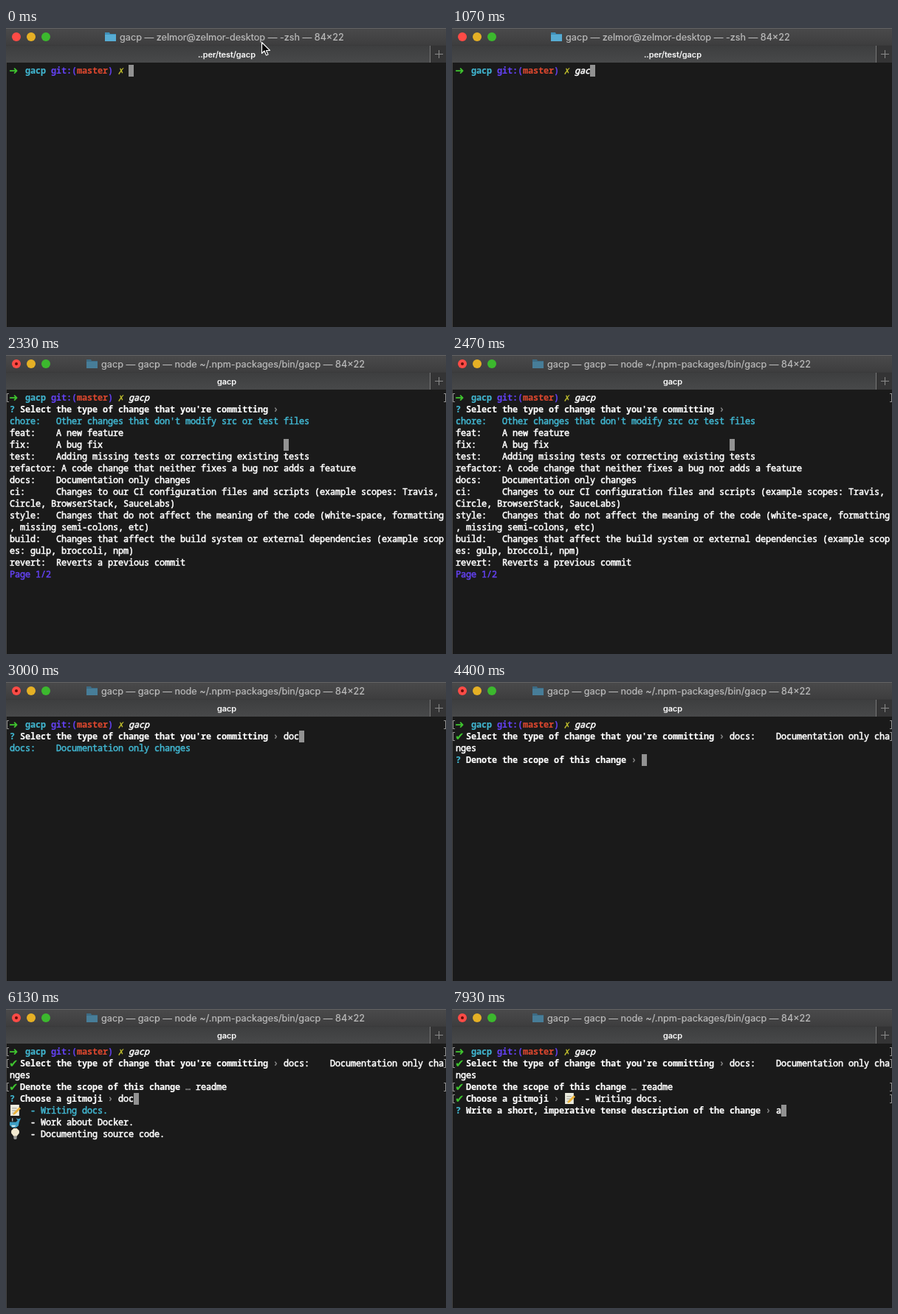
Recreate the animation shown at these times as an HTML page with a canvas. Size 596 by 406 pixels, loop 8000 ms.

```html
<!DOCTYPE html>
<html lang="en">
<head>
<meta charset="utf-8">
<title>Terminal session</title>
<style>
  html, body { margin: 0; width: 100%; height: 100%; overflow: hidden; background: #1a1a1a; }
  canvas { display: block; }
</style>
</head>
<body>
<canvas id="stage" width="596" height="406"></canvas>
<script>
const ctx = document.getElementById('stage').getContext('2d');
const LOOP = 8000, COLS = 84, CELL_W = 7, CELL_H = 16, LEFT = 5, TOP = 50;
const MONO = '11.8px "Noto Sans Mono", "DejaVu Sans Mono", monospace';
const SYMBOLS = '"DejaVu Sans", sans-serif';
const symbolSize = { '➜': 15, '✔': 15, '✗': 12 };
const UI = 'Inter, "Open Sans", sans-serif';
const color = {
  white: '#fff', gray: '#858585', cyan: '#41b5cf', green: '#3fc42f',
  purple: '#6241ee', red: '#d9472f', yellow: '#bdbb2c', caret: '#929292'
};

// Moments (ms) at which keys are pressed and the screen answers
const keys = {
  command: [870, 970, 1070, 1170],
  type: [2530, 2730, 2930],
  scope: [4500, 4670, 4800, 4930, 5070, 5270],
  emoji: [5930, 6000, 6130],
  message: [7870]
};
const when = { mouseGone: 870, run: 1330, typeList: 1600, typeDone: 3270,
               scopeDone: 5400, emojiFilter: 6130, emojiDone: 6530 };

const types = Object.entries({
  chore: "Other changes that don't modify src or test files",
  feat: 'A new feature',
  fix: 'A bug fix',
  test: 'Adding missing tests or correcting existing tests',
  refactor: 'A code change that neither fixes a bug nor adds a feature',
  docs: 'Documentation only changes',
  ci: 'Changes to our CI configuration files and scripts (example scopes: Travis, Circle, BrowserStack, SauceLabs)',
  style: 'Changes that do not affect the meaning of the code (white-space, formatting, missing semi-colons, etc)',
  build: 'Changes that affect the build system or external dependencies (example scopes: gulp, broccoli, npm)',
  revert: 'Reverts a previous commit'
}).map(([name, text]) => (name + ':').padEnd(8) + ' ' + text);

const gitmojis = [
  'none', '✨  - Introducing new features.', '🐛  - Fixing a bug.', '♻  - Refactoring code.',
  '📝  - Writing docs.', '✅  - Updating tests.', '🔧  - Changing configuration files.',
  '⬆  - Upgrading dependencies.', '🔀  - Merging branches.', '🔖  - Releasing / Version tags.'
];
const docMojis = [gitmojis[4], '🐳  - Work about Docker.', '💡  - Documenting source code.'];

// Small pictures on a 14 x 14 grid: fill colour, path
const tile = 'M1 0h12l1 1v12l-1 1H1l-1-1V1z';
const pictures = {
  '✨': [['#f0cf6a', 'M6 3l1 4 4 1-4 1-1 4-1-4-4-1 4-1zM11 1l.6 2 2 .6-2 .6-.6 2-.6-2-2-.6 2-.6zM11 9l.5 1.500 1.500.5-1.500.5-.5 1.500-.5-1.500-1.500-.5 1.500-.5z']],
  '🐛': [['#8b9a4a', 'M1 3l3-2 4 4-3 3z'], ['#a58b62', 'M5 7l3-3 6 7-3 3z'], ['#3c3a2c', 'M3 2h2v2H3zM8 7h2v2H8z']],
  '♻': [['#2f9d3a', 'M4 1h5l3 4-3 1-2-3-2 3-3-2zM1 6l4 1-1 4h3v3H3l-3-5zM10 7l3-1 1 4-3 4H9V9z']],
  '📝': [['#ececdf', 'M1 0h11v14H1z'], ['#9a9a94', 'M3 4h6v1H3zM3 7h5v1H3zM3 10h4v1H3z'], ['#eab23c', 'M12 3l2 2-7 7-3 1 1-3z']],
  '✅': [['#2fb344', tile], ['#fff', 'M2 8l2-2 2 3 5-6 1 1-6 8z']],
  '🔧': [['#a9b0b4', 'M1 2l2 2 2-1V1l3 3-1 2 7 6-2 2-6-7-3 0-3-3z']],
  '⬆': [['#7fa9c6', tile], ['#fff', 'M7 2l5 5H9v5H5V7H2z']],
  '🔀': [['#7fa9c6', tile], ['#fff', 'M1 3h3l5 6h1V7l3 3-3 3v-2H8L3 5H1zM1 9h2l1-1 1 1-1 2H1zM7 5l2-2h1V1l3 3-3 3V5L8 6z']],
  '🔖': [['#e4e1d9', 'M1 8l7-7 5 5-7 8z'], ['#b5493c', 'M9 3l3-3 2 1-4 4z']],
  '🐳': [['#3d9fc4', 'M0 7h8l2-2-2-3 3 1 3-1-2 5-1 5-3 2H3L0 11z'], ['#c6e3ec', 'M2 11h6l-2 2H3zM3 2h1v4H3z']],
  '💡': [['#f3ead0', 'M5 0h4l3 3v3l-3 4H5L2 6V3z'], ['#9b9b98', 'M5 10h4v3l-1 1H6l-1-1z']]
};

const pos = { col: 0, row: 0 };
const cellX = col => LEFT + col * CELL_W;
const cellY = row => TOP + row * CELL_H;

function fill(style, x, y, w, h) {
  ctx.fillStyle = style;
  ctx.fillRect(x, y, w, h);
}

function disc(x, y, r, style) {
  ctx.fillStyle = style;
  ctx.beginPath();
  ctx.arc(x, y, r, 0, 2 * Math.PI);
  ctx.fill();
}

// A thin outline in the same colour gives the heavy smoothing of the screen
function label(text, x, y, font, style, { align = 'left', outline = 0 } = {}) {
  ctx.font = font;
  ctx.fillStyle = ctx.strokeStyle = style;
  ctx.textAlign = align;
  ctx.fillText(text, x, y);
  if (outline) {
    ctx.lineWidth = outline;
    ctx.lineJoin = 'round';
    ctx.strokeText(text, x, y);
  }
}

function shape(paths, x, y, scale = 1) {
  ctx.save();
  ctx.translate(x, y);
  ctx.scale(scale, scale);
  for (const [style, path] of paths) {
    ctx.fillStyle = style;
    ctx.fill(new Path2D(path));
  }
  ctx.restore();
}

function gradient(y0, y1, from, to) {
  const g = ctx.createLinearGradient(0, y0, 0, y1);
  g.addColorStop(0, from);
  g.addColorStop(1, to);
  return g;
}

// Writes on the character grid and wraps at the last column
function write(text, style = color.white, face = 'normal') {
  const outline = face === 'bold' ? 0.15 : 0.55;
  for (const ch of text) {
    if (pos.col >= COLS) newline();
    const x = cellX(pos.col), y = cellY(pos.row);
    if (pictures[ch]) {
      shape(pictures[ch], x, y, 15 / 14);
      pos.col += '♻⬆'.includes(ch) ? 1 : 2;
      continue;
    }
    if (symbolSize[ch]) {
      label(ch, x - 1, y + 12.5, `bold ${symbolSize[ch]}px ${SYMBOLS}`, style);
    } else if (ch !== ' ') {
      label(ch, x + CELL_W / 2, y + 12, `${face} ${MONO}`, style, { align: 'center', outline });
    }
    pos.col++;
  }
}

function newline() {
  pos.col = 0;
  pos.row++;
}

function caret({ col, row } = pos) {
  fill(color.caret, cellX(col), cellY(row), CELL_W, CELL_H);
}

function brackets(row) {
  const y = cellY(row) + 2;
  for (const [x, tip] of [[1, 1], [595, 593]]) {
    fill('#909090', x, y, 1, 12);
    fill('#909090', tip, y, 3, 1);
    fill('#909090', tip, y + 11, 3, 1);
  }
}

const typed = (text, times, t) => text.slice(0, times.filter(time => t >= time).length);

function ask(question, answer, done, mark = '›') {
  if (done) brackets(pos.row);
  write(done ? '✔ ' : '? ', done ? color.green : color.cyan, 'bold');
  write(question, color.white, 'bold');
  write(` ${done ? mark : '›'} `, color.gray);
  write(answer);
  if (done) newline();
}

// The caret ends up one row too low for every wrapped item
function choices(items, page) {
  const input = { ...pos };
  newline();
  const first = pos.row;
  items.forEach((item, i) => {
    write(item, i ? color.white : color.cyan);
    newline();
  });
  const wraps = pos.row - first - items.length;
  if (page) write(page, color.purple);
  caret({ col: input.col, row: input.row + wraps });
}

function session(t) {
  pos.col = pos.row = 0;
  const running = t >= when.run;
  if (running) brackets(0);
  write('➜  ', color.green, 'bold');
  write('gacp ', color.cyan, 'bold');
  write('git:(', color.purple, 'bold');
  write('master', color.red, 'bold');
  write(') ', color.purple, 'bold');
  write('✗ ', color.yellow, 'bold');
  write(typed('gacp', keys.command, t), color.white, 'italic');
  if (!running) return caret();

  newline();
  if (t < when.typeList) return caret();
  const typeDone = t >= when.typeDone, query = typed('doc', keys.type, t);
  ask("Select the type of change that you're committing", typeDone ? types[5] : query, typeDone);
  if (!typeDone) return choices(types.filter(item => item.toLowerCase().includes(query)), query ? '' : 'Page 1/2');

  const scopeDone = t >= when.scopeDone;
  ask('Denote the scope of this change', typed('readme', keys.scope, t), scopeDone, '…');
  if (!scopeDone) return caret();

  const emojiDone = t >= when.emojiDone;
  ask('Choose a gitmoji', emojiDone ? docMojis[0] : typed('doc', keys.emoji, t), emojiDone);
  if (!emojiDone) return t < when.emojiFilter ? choices(gitmojis, 'Page 1/7') : choices(docMojis);

  ask('Write a short, imperative tense description of the change', typed('a', keys.message, t));
  caret();
}

function windowFrame(running) {
  fill('#1a1a1a', 0, 0, 596, 406);
  fill(gradient(0, 24, '#4a4a4b', '#3d3d3e'), 0, 0, 596, 24);
  fill('#636364', 0, 0, 596, 1);
  fill(gradient(24, 47, '#3d3e3f', '#48494a'), 0, 24, 574, 23);
  fill('#343435', 575, 24, 21, 23);
  fill('#3a3a3b', 0, 23, 596, 1);
  fill('#777', 574, 24, 1, 23);
  fill('#8a8a8a', 581, 35, 11, 1);
  fill('#8a8a8a', 586, 30, 1, 11);
  fill('#444', 0, 47, 1, 359);

  ['#fe4b46', '#e5b025', '#3cb82e'].forEach((style, i) => disc(14 + 20 * i, 12, 6, style));
  if (running) disc(14, 12, 2, '#650d09');

  const x = running ? 109 : 134;
  shape([[running ? '#3c6b84' : '#3f8fb8', 'M0 1h6l1 2h8v10H0z'],
         [running ? '#477d98' : '#57acd3', 'M0 4h15v9H0z']], x, 5);
  const title = running ? 'gacp — gacp — node ~/.npm-packages/bin/gacp — 84×22'
                        : 'gacp — zelmor@zelmor-desktop — -zsh — 84×22';
  label(title, x + 20, 17, `12.7px ${UI}`, '#bcbcbc', { outline: 0.2 });
  label(running ? 'gacp' : '..per/test/gacp', 299, 40, `500 11px ${UI}`, '#fff', { align: 'center', outline: 0.2 });
}

function mouse(t) {
  if (t >= when.mouseGone) return;
  const p = Math.min(1, Math.max(0, (t - 70) / 600)), ease = p * p * (3 - 2 * p);
  ctx.save();
  ctx.translate(346.5 + 85 * ease, 19.5 + 91 * ease);
  const arrow = new Path2D('M0 0v15l3.500-3.500 2.500 6 2.500-1-2.500-5.500h5z');
  ctx.fillStyle = '#000';
  ctx.strokeStyle = '#fff';
  ctx.lineWidth = 1.2;
  ctx.fill(arrow);
  ctx.stroke(arrow);
  ctx.restore();
}

function draw() {
  const t = performance.now() % LOOP;
  windowFrame(t >= when.run);
  session(t);
  mouse(t);
  requestAnimationFrame(draw);
}
draw();
</script>
</body>
</html>
```
